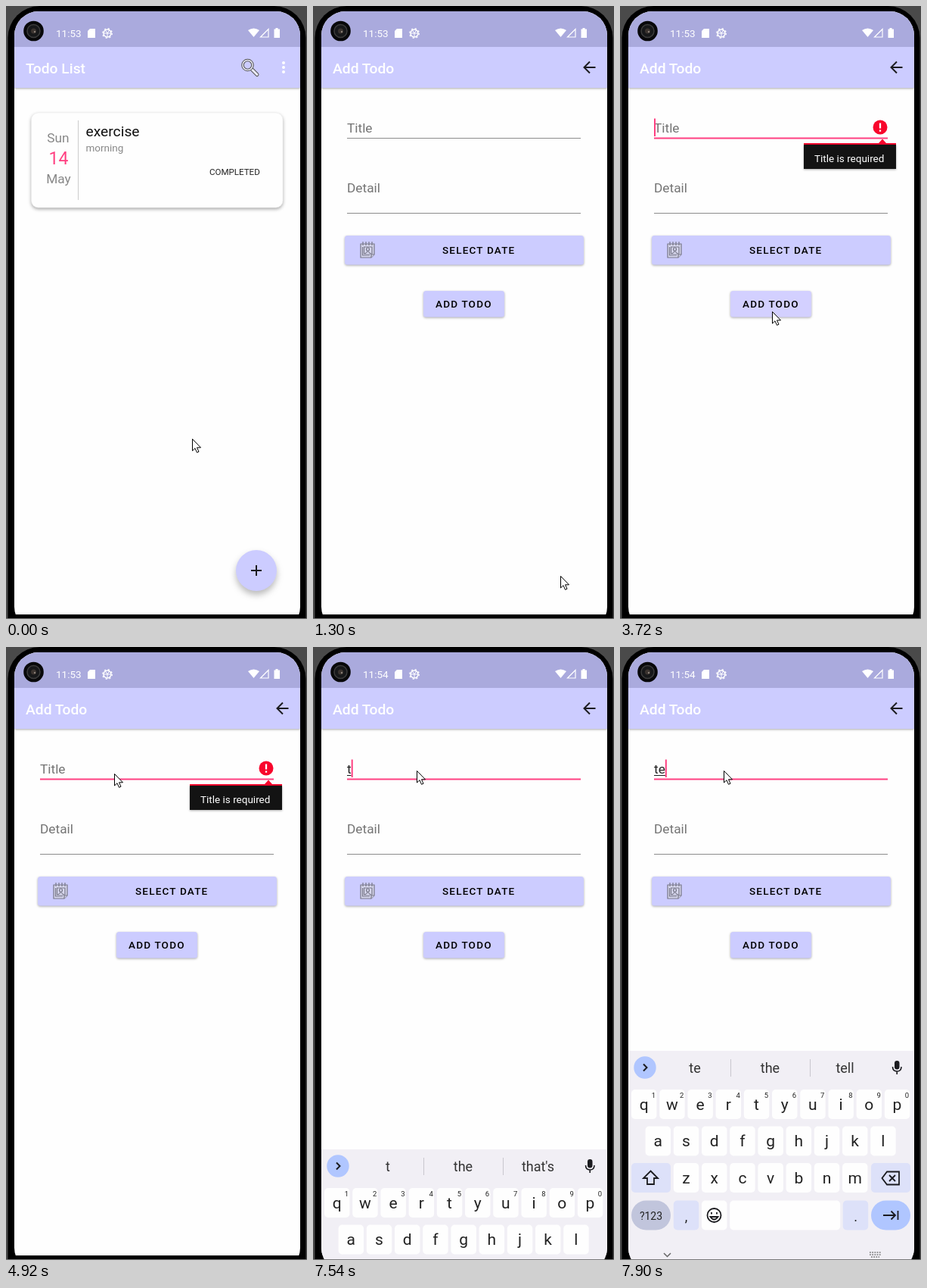
These frames come from a looping animation (398 px wide and 809 px high, 8000 ms). An HTML page:

```html
<!DOCTYPE html>
<html lang="en">
<head>
<meta charset="utf-8">
<title>Todo app</title>
<style>
html, body { margin: 0; width: 100%; height: 100%; overflow: hidden; background: #000; }
svg { display: block; font-family: Roboto, sans-serif; }
.mid { text-anchor: middle; }
.bold { font-weight: 500; }
.white { fill: #fff; }
.gray { fill: #888; }
.hint { fill: #747474; }
.s13 { font-size: 13.5px; }
.s17 { font-size: 17.3px; }
.s19 { font-size: 19.25px; }
.btn { font-size: 13.5px; font-weight: 500; letter-spacing: 1.2px; }
.line { fill: none; stroke: #1b1b1f; stroke-width: 2; }
.soft { filter: drop-shadow(0 1.5px 1.5px #0005); }
.fab { filter: drop-shadow(0 5px 4px #0004); }
</style>
</head>
<body>
<svg width="398" height="809" viewBox="0 0 398 809">
  <defs>
    <clipPath id="screen"><rect x="11" y="7" width="378" height="818" rx="32"/></clipPath>
    <radialGradient id="press">
      <stop offset=".2" stop-color="#334" stop-opacity=".5"/>
      <stop offset="1" stop-color="#334" stop-opacity="0"/>
    </radialGradient>
  </defs>
  <rect width="398" height="809" fill="#4a4a4a"/>
  <rect x="2.5" y="0" width="394" height="850" rx="42"/>

  <g clip-path="url(#screen)">
    <rect x="11" y="7" width="378" height="796" fill="#fefefe"/>
    <rect x="11" y="54" width="378" height="54" fill="#ccf" class="soft"/>
    <rect x="11" y="7" width="378" height="47" fill="#aad"/>

    <g class="white">
      <text id="clock" x="66" y="41" class="s13">11:53</text>
      <path d="M111 30H118V42H108V33Z"/>
      <path d="M320 32Q327.500 27 335 32L327.500 41Z"/>
      <path d="M347 30.500V41H336.500Z" fill="none" stroke="#fff" stroke-width="1.200"/>
      <path d="M356.500 29H359.500V30.500H362V42H354.500V30.500H356.500Z"/>
      <g fill="none" stroke="#fff">
        <circle cx="134" cy="36" r="5" stroke-width="1.500"/>
        <circle cx="134" cy="36" r="6.300" stroke-width="1.300" stroke-dasharray="2.200 2.748"/>
        <path d="M129 36H139M134 36V41M131.500 32L134 36L136.500 32"/>
      </g>
    </g>
    <text id="heading" x="26" y="89" class="bold white s19"></text>

    <g id="list">
      <g fill="none" stroke-linecap="round">
        <path d="M325.500 84L332 90.500" stroke="#555" stroke-width="5"/>
        <path d="M325.500 84L332 90.500" stroke="#e8e8f4" stroke-width="3"/>
        <circle cx="319.500" cy="78" r="6.500" stroke="#555" stroke-width="3.600"/>
        <circle cx="319.500" cy="78" r="6.500" stroke="#e8e8f4" stroke-width="1.500"/>
      </g>
      <g class="white">
        <circle cx="367" cy="75" r="2"/><circle cx="367" cy="81" r="2"/><circle cx="367" cy="87" r="2"/>
      </g>
      <rect x="33.500" y="141" width="332.500" height="125" rx="9" fill="#fefefe" stroke="#eee" stroke-width=".6" style="filter:drop-shadow(0 2px 2px #0005)"/>
      <g class="mid gray s17">
        <text x="69" y="180">Sun</text>
        <text x="69.500" y="209" font-size="23.100" fill="#ff4081">14</text>
        <text x="69.500" y="234">May</text>
      </g>
      <path d="M95.500 151V256" stroke="#ccc"/>
      <text x="105.500" y="172" class="s19" fill="#111">exercise</text>
      <text x="105.500" y="192" class="gray s13">morning</text>
      <text x="269" y="223" font-size="11.550" fill="#222">COMPLETED</text>
      <circle id="fab" cx="331" cy="745" r="27" fill="#ccf" class="fab"/>
      <circle id="touch" cx="328" cy="749" r="18" fill="url(#press)"/>
      <path d="M324 745H338M331 738V752" class="line" stroke="#000"/>
    </g>

    <g id="form">
      <path d="M373.500 81H359M366 73.500L358.500 81L366 88.500" class="line"/>
      <text id="title" x="45" y="167" class="s17"></text>
      <path id="under" class="line" style="stroke-width:1"/>
      <rect id="rule" x="45" width="309"/>
      <rect id="caret" y="148.500" width="2" height="23.500" fill="#ff4081"/>
      <text x="45" y="246" class="hint s17">Detail</text>
      <rect x="45" y="273" width="309" height="1" fill="#8c8c8c"/>
      <rect x="42" y="303" width="316" height="38.500" rx="3.500" fill="#ccf" class="soft"/>
      <text x="171" y="327" class="btn">SELECT DATE</text>
      <g fill="#d8d8ee" stroke="#778" stroke-width="1.200">
        <path d="M63 314H81V328L77 332H63Z"/>
        <path d="M66 311V316M70 311V316M74 311V316M78 311V316M65.500 318V329H75"/>
        <path d="M67.500 318H78V327H67.500Z"/>
        <circle cx="72.500" cy="321" r="2"/>
        <path d="M69 327Q72.500 321.500 76 327M77 332V328H81"/>
      </g>
      <rect id="add" x="146" y="376" width="107" height="34.500" rx="3.500" class="soft"/>
      <text x="162" y="398" class="btn">ADD TODO</text>
      <g id="error">
        <circle cx="344" cy="160" r="9.500" fill="#f8062c"/>
        <path d="M344 154.500V161.500M344 163.500V165.700" stroke="#fff" stroke-width="2.300"/>
      </g>
      <g id="popup">
        <path d="M243 183V181H342L347 175.500L352 181H365V183Z" fill="#f8062c"/>
        <rect x="243" y="183" width="122" height="32" fill="#131313" class="soft"/>
        <text x="257" y="205.500" class="white s13">Title is required</text>
      </g>
    </g>

    <g id="board">
      <rect x="11" y="533" width="378" height="300" fill="#f1eff5"/>
      <circle cx="33" cy="555" r="14.700" fill="#b0c6ff"/>
      <path d="M31 550.500L35.500 555L31 559.500" class="line"/>
      <g class="mid" font-size="18" fill="#333">
        <text id="left" x="99" y="562"></text>
        <text x="198.500" y="562">the</text>
        <text id="right" x="297.500" y="562"></text>
      </g>
      <path d="M146.500 544V567M251.500 544V567" stroke="#c8c7ce"/>
      <rect x="363" y="546" width="6.500" height="11.500" rx="3.200" fill="#1b1b1f"/>
      <path d="M360.500 554Q360.500 560 366.200 560T372 554M366.200 560V564" class="line" style="stroke-width:1.600"/>
      <g id="keys"></g>
      <g class="line" style="stroke-width:1.800">
        <path d="M40.500 691.500L50 701H45V709H36V701H31Z"/>
        <path d="M353 692.500H369V709.500H353L346.500 701ZM356 697L364 705M364 697L356 705"/>
        <circle cx="124.500" cy="750" r="9"/>
        <path d="M119.500 752Q124.500 759 129.500 752Z"/>
        <path d="M121 746V748.500M128 746V748.500"/>
        <path d="M348 750H363M358.500 744.500L364 750L358.500 755.500M367.500 744V756"/>
        <path d="M58 800L62.500 804.500L67 800" stroke="#666" style="stroke:#666;stroke-width:1.500"/>
      </g>
      <path d="M330 799H345M330 802H345M332 805H343" stroke="#777" stroke-width="1.700" stroke-dasharray="1.800 1.400"/>
    </g>
  </g>

  <circle cx="36.500" cy="33" r="13.300" fill="#08080a"/>
  <circle cx="36.500" cy="33" r="8.500" fill="#17181a" stroke="#3c3c3c" stroke-width="1.500"/>
  <circle cx="36.500" cy="33" r="3.500" fill="#3a332f"/>
  <circle cx="38" cy="34" r="1.200" fill="#8c8078"/>
  <rect y="808" width="398" height="1" fill="#777"/>
  <path id="cursor" d="M.5 .5V16L4 12.700L6.500 18.300L9 17.200L6.500 11.800H11.500Z" fill="#fff" stroke="#000"/>
</svg>
<script>
const el = {};
document.querySelectorAll('[id]').forEach(e => el[e.id] = e);

// Keyboard
const keyRect = (x, y, w, fill, r = 5) =>
  `<rect x="${x}" y="${y}" width="${w}" height="39" rx="${r}" fill="${fill}"/>`;
const label = (x, y, s, size) =>
  `<text class="mid" x="${x}" y="${y}" font-size="${size}" fill="#222">${s}</text>`;
const pitch = 37.2, tint = '#dde1f9';
const row = (chars, x, y) => [...chars].map((c, i) =>
  keyRect(x + i * pitch, y, 33.5, '#fefefe') + label(x + 16.7 + i * pitch, y + 26.5, c, 21)).join('');
const digits = [...'1234567890'].map((d, i) => label(44.5 + i * pitch, 595, d, 9.5)).join('');
el.keys.innerHTML = row('qwertyuiop', 15, 584) + digits +
  row('asdfghjkl', 33.6, 632.5) + row('zxcvbnm', 70.8, 681) +
  keyRect(15, 681, 52, tint) + keyRect(332, 681, 52, tint) +
  keyRect(15, 730.5, 52, '#c1c5dc', 19.5) + label(41, 755.5, '?123', 14) +
  keyRect(70.8, 730.5, 33.5, tint) + label(87.5, 758, ',', 18) +
  keyRect(108, 730.5, 33.5, '#fefefe') + keyRect(145.2, 730.5, 146, '#fefefe') +
  keyRect(294.7, 730.5, 33.5, tint) + label(311.5, 758, '.', 18) +
  keyRect(332, 730.5, 52, '#b0c6ff', 19.5);

// Held steps: [time, value...]
const pointer = [
  [0, 246, 571], [150, 246, 591], [290, 266, 607], [410, 292, 630], [530, 312, 650],
  [650, 322, 710], [770, 327, 752], [2000, 341, 421], [2130, 331, 290], [2280, 266, 235],
  [2420, 225, 257], [2550, 191, 303], [2670, 191, 321], [2820, 196, 370], [2970, 201, 401],
  [3120, 201, 403], [4430, 196, 380], [4550, 178, 310], [4670, 158, 235], [4800, 147, 185],
  [4920, 143, 167], [5070, 137, 163]];
const slide = [[0, 300], [7540, 130], [7660, 47], [7780, 8], [7900, 0]];
const blink = [[0, 0], [3570, 1], [4020, 0], [4430, 1], [4920, 0], [5440, 1], [5990, 0], [6420, 1], [7000, 0], [7420, 1]];
const typed = [[0, 'Title'], [7420, 't'], [7660, 'te']];
const at = (steps, t) => steps.findLast(s => s[0] <= t).slice(1);

const show = (e, on) => e.style.display = on ? '' : 'none';
const set = (e, attrs) => { for (const k in attrs) e.setAttribute(k, attrs[k]); };

function draw(now) {
  const t = now % 8000;
  const within = (a, b) => t >= a && t < b;
  const form = t >= 1300, focus = t >= 3570, typing = t >= 7420, late = t >= 7780;
  const pressed = within(1160, 1300);
  const word = at(typed, t)[0];
  const width = typing ? (word === 't' ? 5.7 : 14.8) : 0;

  show(el.list, !form);
  show(el.form, form);
  el.heading.textContent = form ? 'Add Todo' : 'Todo List';
  el.clock.textContent = t < 6420 ? '11:53' : '11:54';
  show(el.touch, pressed);
  el.fab.style.filter = pressed ? 'drop-shadow(0 7px 6px #0005)' : '';

  el.title.textContent = word;
  set(el.title, { fill: typing ? '#222' : '#747474' });
  show(el.under, typing);
  set(el.under, { d: `M45 169.500H${late ? 60 : 50.7}` });
  set(el.rule, focus ? { y: 173.5, height: 2, fill: '#ff4081' } : { y: 174, height: 1, fill: '#8c8c8c' });
  show(el.caret, at(blink, t)[0]);
  set(el.caret, { x: 45 + width });
  show(el.error, focus && !typing);
  show(el.popup, t >= 3720 && !typing);
  set(el.add, { fill: within(3720, 4430) ? '#d3d0ff' : '#ccf' });
  el.add.style.filter = within(3270, 3720) ? 'drop-shadow(0 3px 2px #0005)' : '';

  el.left.textContent = late ? 'te' : 't';
  el.right.textContent = late ? 'tell' : "that's";
  set(el.board, { transform: `translate(0 ${at(slide, t)[0]})` });
  set(el.cursor, { transform: `translate(${at(pointer, t)})` });
  requestAnimationFrame(draw);
}
draw(performance.now());
</script>
</body>
</html>
```
